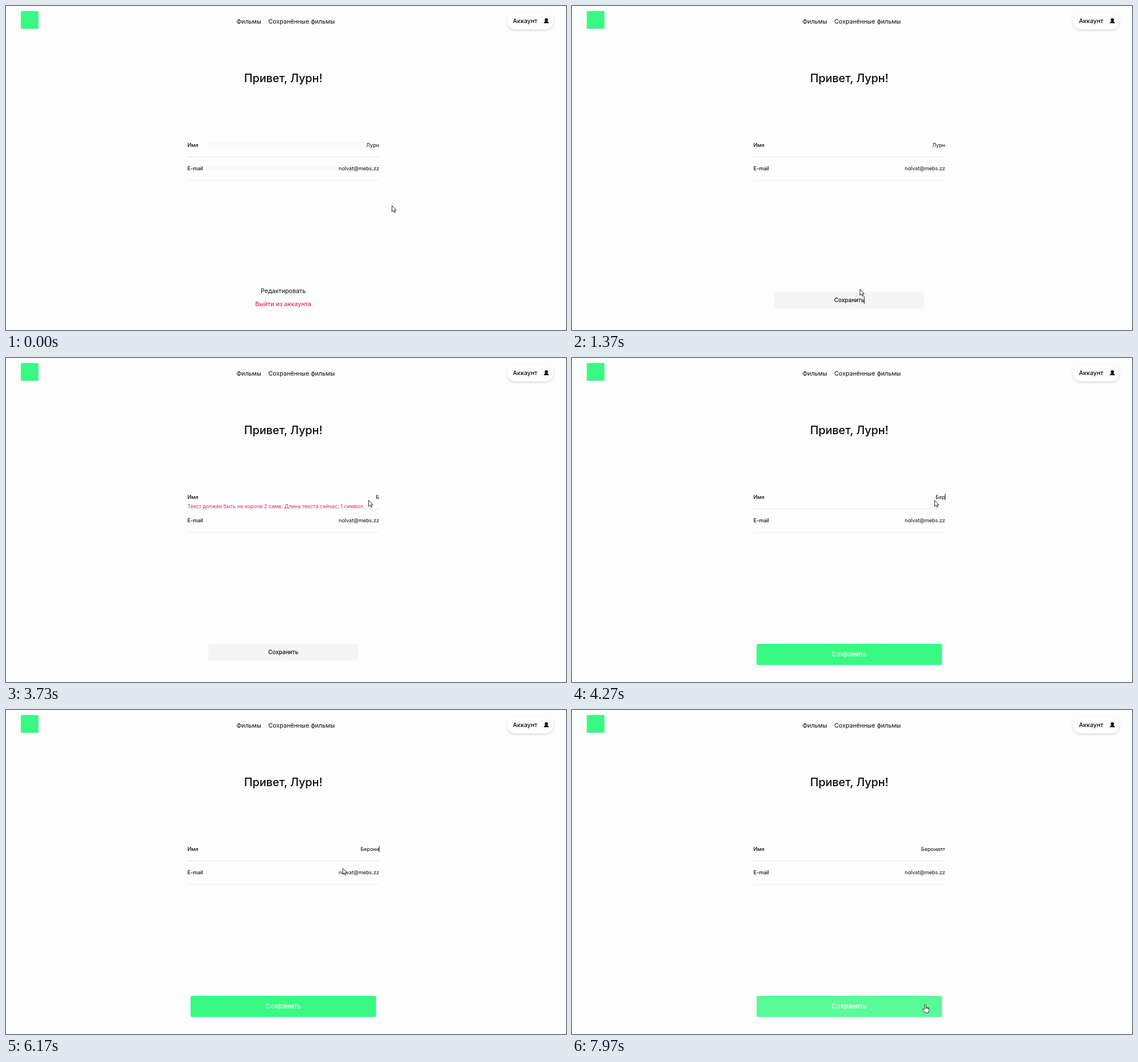
Recreate the animation shown at these times as an HTML page. Size 983 by 570 pixels, loop 8 s.

```html
<!DOCTYPE html>
<html lang="ru">
<head>
<meta charset="utf-8">
<style>
  html, body { margin: 0; width: 100%; height: 100%; overflow: hidden; background: #fdfdfd; }
  svg { display: block; font: 10.7px Inter, "Open Sans", sans-serif; fill: #0a0a0a; }
  .medium { font-weight: 500; }
  .small { font-size: 9.06px; }
  .red { fill: #d12f5c; }
  .end { text-anchor: end; }
  .mid { text-anchor: middle; }
  .pill { fill: #fdfdfd; filter: drop-shadow(0 2px 2.5px rgba(0, 0, 0, .13)); }
  #pointer path { fill: #fff; stroke: #111; stroke-width: .9; stroke-linejoin: round; }
</style>
</head>
<body>
<svg width="983" height="570" viewBox="0 0 983 570">
  <rect x="26" y="9" width="31" height="31" fill="#38fa82"/>
  <text x="404.5" y="30.5">Фильмы</text>
  <text x="460.5" y="30.5">Сохранённые фильмы</text>
  <rect class="pill" x="879" y="11" width="82" height="30" rx="15"/>
  <text class="medium" x="889.7" y="30">Аккаунт</text>
  <circle cx="948.5" cy="26" r="9.5" fill="#f9f9f9"/>
  <circle cx="948.5" cy="24.2" r="2.8"/>
  <path d="M944.3 30.3V29Q944.5 27.4 947 27H950Q952.5 27.4 952.7 29V30.3Z"/>

  <text class="mid medium" x="486.7" y="133.5" font-size="19.8">Привет, Лурн!</text>

  <g id="disabledFields" fill="#f9f9fa">
    <rect x="352" y="239" width="303" height="10"/>
    <rect x="352" y="280" width="303" height="10"/>
  </g>
  <rect x="318.5" y="265" width="337" height="1" fill="#e6e6e6"/>
  <rect x="318.5" y="306.5" width="337" height="1" fill="#eeeef1"/>
  <g class="small">
    <text class="medium" x="318.5" y="247.7">Имя</text>
    <rect id="selection" y="239" height="10.5" fill="#3367d1"/>
    <text class="end" id="name" x="655" y="247.7"></text>
    <text class="medium" x="318.5" y="289">E-mail</text>
    <text class="end" x="655" y="289">nolvat@mebs.zz</text>
    <text class="red" id="error" x="318.5" y="264">Текст должен быть не короче 2 симв. Длина текста сейчас: 1 символ.</text>
  </g>
  <rect id="nameCaret" x="654.5" y="239" width="1" height="11"/>

  <g id="profileActions" class="mid">
    <text x="486.7" y="504.5">Редактировать</text>
    <text class="medium red" x="486.7" y="528">Выйти из аккаунта</text>
  </g>
  <g id="saveDisabled" class="mid medium">
    <rect x="355.5" y="503" width="262.5" height="29.5" rx="2.5" fill="#f5f5f5"/>
    <text x="486.7" y="521" font-size="9.9">Сохранить</text>
  </g>
  <rect id="buttonCaret" x="512.5" y="511" width="1" height="13"/>
  <g id="saveActive" class="mid medium">
    <rect x="324" y="503" width="325.5" height="37" rx="2.5" fill="#38fa82"/>
    <text x="486.7" y="525.3" font-size="11.5" fill="#fff">Сохранить</text>
  </g>

  <g id="pointer">
    <path id="arrow" d="M.5 .5V11L3 8.8 4.8 12.6 6.5 11.8 4.8 8.2H8Z"/>
    <path id="hand" d="M-1.2 9V1.2Q-1 .1 0 .1T1.3 1.2V5.2Q2.3 4.4 3.3 5.5 4.3 4.8 5.2 6 6.7 5.7 6.8 7.2V10.2Q6.7 12 5.6 13.2V14.8H-.6V13.7L-4.4 9.2Q-4.8 7.7 -3.2 7.8ZM1.3 5.2V7.8M3.3 5.5V8M5.2 6V8.2"/>
  </g>
</svg>
<script>
const DURATION = 8000, BLINK = 530;
const OLD_NAME = 'Лурн', NEW_NAME = 'Беронилт';
const EDIT = 1050, SELECT = 2300;
const KEYS = [3150, 3800, 4050, 4300, 4550, 4800, 6750, 7050];
// Pointer stops: time, x, y
const PATH = [
  [0, 677, 351], [30, 677, 351], [830, 510, 478], [870, 510, 478], [1000, 505, 498],
  [1370, 505, 498], [2170, 638, 252], [2250, 636, 250], [5600, 636, 250],
  [6130, 590.5, 278], [7250, 590.5, 278], [7850, 620, 518], [DURATION, 620, 518]
];

const byId = id => document.getElementById(id);
const show = (id, on) => byId(id).style.display = on ? '' : 'none';
const between = (t, from, to) => t >= from && t < to;
const blinkOn = elapsed => elapsed % (2 * BLINK) < BLINK;

function pointerAt(t) {
  const i = PATH.findIndex(stop => stop[0] > t);
  const [t0, x0, y0] = PATH[i - 1], [t1, x1, y1] = PATH[i];
  const p = (t - t0) / (t1 - t0), e = p * p * (3 - 2 * p);
  return [x0 + (x1 - x0) * e, y0 + (y1 - y0) * e];
}

function render(t) {
  const editing = t >= EDIT, valid = t >= KEYS[1];
  const selected = between(t, SELECT, KEYS[0]);
  const typed = KEYS.filter(key => key <= t);
  const [x, y] = pointerAt(t);
  const overSave = valid && y > 503;
  const hand = between(t, 930, EDIT) || between(t, 2170, KEYS[0]) || overSave;

  show('disabledFields', !editing);
  show('profileActions', !editing);
  show('saveDisabled', editing && !valid);
  show('saveActive', valid);
  byId('saveActive').style.opacity = overSave ? .82 : 1;
  show('buttonCaret', between(t, EDIT, SELECT) && blinkOn(t - EDIT));
  show('nameCaret', typed.length && blinkOn(t - typed.at(-1)));
  show('error', between(t, KEYS[0], KEYS[1]));

  const name = byId('name');
  name.textContent = typed.length ? NEW_NAME.slice(0, typed.length) : OLD_NAME;
  name.style.fill = selected ? '#fff' : '';
  show('selection', selected);
  if (selected) {
    const width = name.getComputedTextLength();
    byId('selection').setAttribute('x', 655 - width);
    byId('selection').setAttribute('width', width);
  }

  show('arrow', !hand);
  show('hand', hand);
  byId('pointer').setAttribute('transform', `translate(${x} ${y})`);
}

const start = performance.now();
function tick() {
  render((performance.now() - start) % DURATION);
  requestAnimationFrame(tick);
}
tick();
</script>
</body>
</html>
```
